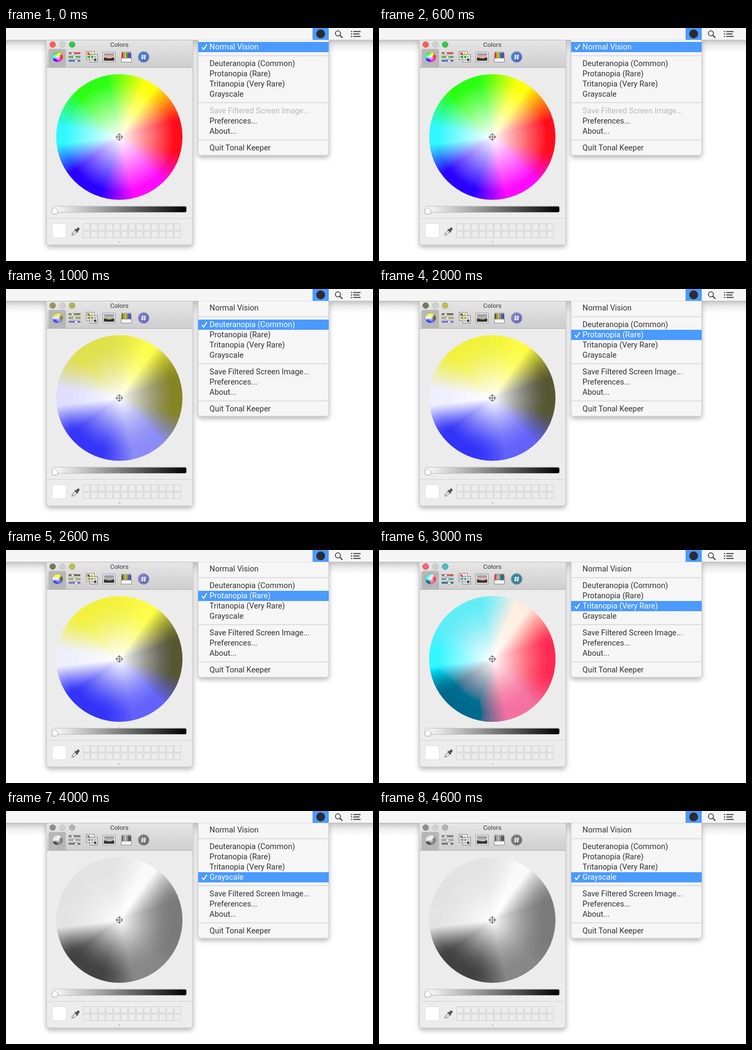
An HTML page that plays this animation: 680 px wide and 434 px high, repeating every 5000 ms.

```html
<!DOCTYPE html>
<html lang="en">
<head>
<meta charset="utf-8">
<title>Colour vision menu</title>
<style>
  html, body { margin: 0; width: 680px; height: 434px; overflow: hidden; background: #fff; }
  svg { position: absolute; left: 0; top: 0; overflow: visible; }
  text { font-family: Roboto, Arial, sans-serif; }
  /* Each hue holds over a sector; full saturation is reached before the rim */
  .wheel {
    position: absolute; border-radius: 50%;
    background:
      radial-gradient(closest-side, #fff, #fff0 87%),
      conic-gradient(from 90deg,
        #ff0d1b 0 15deg, #ff0aff 46deg 76deg, #2a00ff 108deg 143deg, #2ff8ff 173deg 190deg,
        #2bff14 226deg 258deg, #ffff0a 295deg 306deg, #ff0d1b 343deg);
  }
  #big { left: 92.5px; top: 85.5px; width: 234px; height: 234px; }
  #small { left: 86px; top: 44.5px; width: 18.5px; height: 18.5px; box-shadow: 0 0 0 .8px #8889; }
</style>
</head>
<body>
<svg id="stage" width="680" height="434">
  <defs>
    <!-- Vision simulations in linear light; each row sums to 1 so greys stay put -->
    <filter id="deutan"><feColorMatrix values=".23 .74 .03 0 0  .23 .74 .03 0 0  .005 .065 .93 0 0  0 0 0 1 0"/></filter>
    <filter id="protan"><feColorMatrix values=".09 .88 .03 0 0  .09 .88 .03 0 0  .02 .04 .94 0 0  0 0 0 1 0"/></filter>
    <filter id="tritan">
      <feColorMatrix in="SourceGraphic" result="warm" values=".99 .1 -.09 0 0  .02 .84 .14 0 0  .09 .65 .26 0 0  0 0 0 1 0"/>
      <feColorMatrix in="SourceGraphic" result="cool" values=".99 .1 -.09 0 0  .02 .84 .14 0 0  -.2 .93 .27 0 0  0 0 0 1 0"/>
      <feBlend in="warm" in2="cool" mode="lighten"/>
    </filter>
    <filter id="gray"><feColorMatrix values=".19 .76 .05 0 0  .19 .76 .05 0 0  .19 .76 .05 0 0  0 0 0 1 0"/></filter>

    <filter id="shadow" x="-20%" y="-20%" width="140%" height="140%">
      <feDropShadow dx="0" dy="4" stdDeviation="5" flood-opacity=".3"/>
    </filter>
    <linearGradient id="barShade" x2="0" y2="1"><stop stop-color="#000" stop-opacity=".23"/><stop offset=".45" stop-color="#000" stop-opacity=".07"/><stop offset="1" stop-color="#000" stop-opacity="0"/></linearGradient>
    <linearGradient id="header" x2="0" y2="1"><stop stop-color="#e6e6e6"/><stop offset="1" stop-color="#cecece"/></linearGradient>
    <linearGradient id="ramp"><stop stop-color="#fff"/><stop offset="1"/></linearGradient>
    <linearGradient id="sunset" x2="0" y2="1"><stop stop-color="#7d8fc0"/><stop offset=".5" stop-color="#f3b49a"/><stop offset=".65" stop-color="#f0a070"/></linearGradient>
    <linearGradient id="badge" x2="1" y2="1"><stop stop-color="#3d8ad0"/><stop offset="1" stop-color="#5f5fc0"/></linearGradient>
  </defs>

  <rect y="22" width="680" height="24" fill="url(#barShade)"/>

  <!-- Colour panel -->
  <path d="M75 22H346V399a5 5 0 0 1-5 5H80a5 5 0 0 1-5-5Z" fill="#ececec" stroke="#b4b4b4" stroke-width=".8" filter="url(#shadow)"/>
  <rect x="75" y="22" width="271" height="51" fill="url(#header)"/>
  <path d="M75 73.5H346" stroke="#b1b1b1"/>
  <path d="M79 73V43a4 4 0 0 1 4-4H107a4 4 0 0 1 4 4V73Z" fill="#b7b7b7"/>
  <text x="210" y="35" font-size="11.8" text-anchor="middle" fill="#333">Colors</text>

  <g class="vision">
    <g stroke-width=".8">
      <circle cx="86.5" cy="30.8" r="5.4" fill="#fc5b57" stroke="#df4744"/>
      <circle cx="104.5" cy="30.8" r="5.4" fill="#d0d0d0" stroke="#b9b9b9"/>
      <circle cx="122.5" cy="30.8" r="5.4" fill="#34c84a" stroke="#27aa35"/>
    </g>
    <g id="sliders"></g>
    <g stroke="#666" stroke-width=".8">
      <rect x="148.5" y="43.5" width="15" height="15" fill="#fff"/>
      <rect x="155.5" y="49.5" width="14" height="14" fill="#fff"/>
    </g>
    <g id="swatches"></g>
    <rect x="179.5" y="45" width="23" height="18" fill="#fff" stroke="#777" stroke-width=".8"/>
    <rect x="181.5" y="47" width="19" height="14" fill="url(#sunset)"/>
    <path d="M181.5 54.5l5 1.5 6 1 5-1.5 3-1V61h-19Z" fill="#352f38"/>
    <g id="pencils"></g>
    <circle cx="255" cy="54" r="10.2" fill="url(#badge)" stroke="#8c9cc0"/>
    <path d="M253.4 49.2l-1.2 9.6M257.8 49.2l-1.2 9.6M250.6 52.3h9M250.2 56h9" stroke="#fff" stroke-width="1.4"/>
  </g>

  <rect x="85.5" y="332" width="249" height="11.5" rx="3" fill="url(#ramp)" stroke="#bdbdbd"/>
  <path d="M210 330v1.5" stroke="#aaa"/>
  <path d="M90.5 334l5.5 5.5v5a2 2 0 0 1-2 2h-7a2 2 0 0 1-2-2v-5Z" fill="#fff" stroke="#999" stroke-width=".9"/>
  <path d="M75 354.5H346" stroke="#d3d3d3"/>
  <rect x="85.5" y="364.5" width="26" height="26" rx="4" fill="#fff" stroke="#dedede"/>
  <g transform="translate(128.5 379.5) rotate(45)">
    <rect x="-2" y="-2" width="4" height="9" fill="#f2f2f2" stroke="#777"/>
    <path d="M-1 7.5h2l-1 3Z" fill="#777"/>
    <rect x="-4" y="-4" width="8" height="2.6" rx="1" fill="#555"/>
    <rect x="-2.5" y="-10" width="5" height="7" rx="2.4" fill="#555"/>
  </g>
  <g id="cells" fill="none" stroke="#d0d0d0"></g>
  <circle cx="210.3" cy="398.5" r="1.3" fill="#b0b0b0"/>

  <!-- Menu -->
  <path d="M356 22H598V232a5 5 0 0 1-5 5H361a5 5 0 0 1-5-5Z" fill="#f6f6f6" stroke="#bcbcbc" stroke-width=".8" filter="url(#shadow)"/>
  <path d="M356 51.5H598M356 139H598M356 208.5H598" stroke="#dedede" stroke-width="2"/>
  <g id="mark">
    <rect x="356" y="-9" width="242" height="19" fill="#4a9aff"/>
    <path d="M363 .8l3.2 4 6-9" fill="none" stroke="#fff" stroke-width="1.9"/>
  </g>
  <g id="items" font-size="14.45"></g>

  <!-- Menu bar -->
  <rect width="680" height="22" fill="#f5f5f5"/>
  <path d="M0 22.5H356M598 22.5H680" stroke="#bababa"/>
  <rect x="568" width="30" height="22" fill="#4a9aff"/>
  <circle cx="583" cy="11" r="8.2" fill="#2c2c30"/>
  <g fill="none" stroke="#333">
    <circle cx="615" cy="10" r="4.7" stroke-width="1.5"/>
    <path d="M618.4 13.4l5 5" stroke-width="2"/>
    <path d="M639 6.7h2.4M639 11.2h2.4M639 15.7h2.4M643.5 6.7H657M643.5 11.2H655M643.5 15.7H657" stroke-width="1.7"/>
  </g>
</svg>

<div id="big" class="wheel vision">
  <svg width="234" height="234" fill="none" stroke="#444" stroke-width="1">
    <circle cx="117" cy="117" r="5"/>
    <path d="M110 117h14M117 110v14"/>
  </svg>
</div>
<div id="small" class="wheel vision"></div>

<script>
const byId = id => document.getElementById(id);

function add(parent, tag, attrs, text = '') {
  const node = document.createElementNS('http://www.w3.org/2000/svg', tag);
  for (const key in attrs) node.setAttribute(key, attrs[key]);
  node.textContent = text;
  byId(parent).append(node);
  return node;
}

const box = (parent, x, y, width, height, attrs) =>
  add(parent, 'rect', { x, y, width, height, ...attrs });

// Toolbar icons
['#f04848', '#3fc83f', '#4a6cf0'].forEach((fill, i) => {
  const y = 45.3 + i * 7;
  box('sliders', 116.5, y, 21, 3, { fill, stroke: '#777', 'stroke-width': .6 });
  add('sliders', 'circle', { cx: 123.5 + i * 3.3, cy: y + 2.3, r: 2.5, fill: '#fff', stroke: '#777', 'stroke-width': .6 });
});
['#f0342c', '#f7d22c', '#35b53a', '#8b46d8'].forEach((fill, i) =>
  box('swatches', 150.5 + i % 2 * 6, 45.5 + (i >> 1) * 6, 4.5, 4.5, { fill }));
box('swatches', 155.5, 49.5, 14, 14, { fill: '#fff', stroke: '#666', 'stroke-width': .8 });
['#35b53a', '#bbb', '#bbb', '#444'].forEach((fill, i) =>
  box('swatches', 157.5 + i % 2 * 5.5, 51.5 + (i >> 1) * 5.5, 4.5, 4.5, { fill }));
['#e8342c', '#f2a02c', '#e8d82c', '#35b53a', '#3558e0', '#8b36c8'].forEach((fill, i) => {
  const x = 214 + i * 3;
  add('pencils', 'path', { d: `M${x} 57V48l1.5-4 1.5 4v9Z`, fill, stroke: '#555', 'stroke-width': .4 });
});
box('pencils', 213.5, 56, 19, 7.5, { fill: '#f4f4f4', stroke: '#777', 'stroke-width': .8 });

for (let i = 0; i < 26; i++)
  box('cells', 143.5 + i % 13 * 14, 364.5 + (i / 13 | 0) * 14, 12, 12);

// Menu rows: label and vertical centre
const rows = [
  ['Normal Vision', 35], ['Deuteranopia (Common)', 66], ['Protanopia (Rare)', 85],
  ['Tritanopia (Very Rare)', 104], ['Grayscale', 123], ['Save Filtered Screen Image...', 154],
  ['Preferences...', 173], ['About...', 192], ['Quit Tonal Keeper', 223],
];
const labels = rows.map(([label, y]) => add('items', 'text', { x: 377.1, y: y + 5 }, label));
const filters = ['none', 'url(#deutan)', 'url(#protan)', 'url(#tritan)', 'url(#gray)'];
const SAVE = 5;
let shown = -1;

function show(mode) {
  byId('mark').setAttribute('transform', `translate(0 ${rows[mode][1]})`);
  labels.forEach((label, i) => {
    const off = i === SAVE && mode === 0;
    label.setAttribute('fill', i === mode ? '#fff' : off ? '#b8b8b8' : '#333');
  });
  for (const node of document.querySelectorAll('.vision')) node.style.filter = filters[mode];
}

function tick() {
  const mode = Math.floor(performance.now() / 1000) % filters.length;
  if (mode !== shown) show(shown = mode);
  requestAnimationFrame(tick);
}
tick();
</script>
</body>
</html>
```
